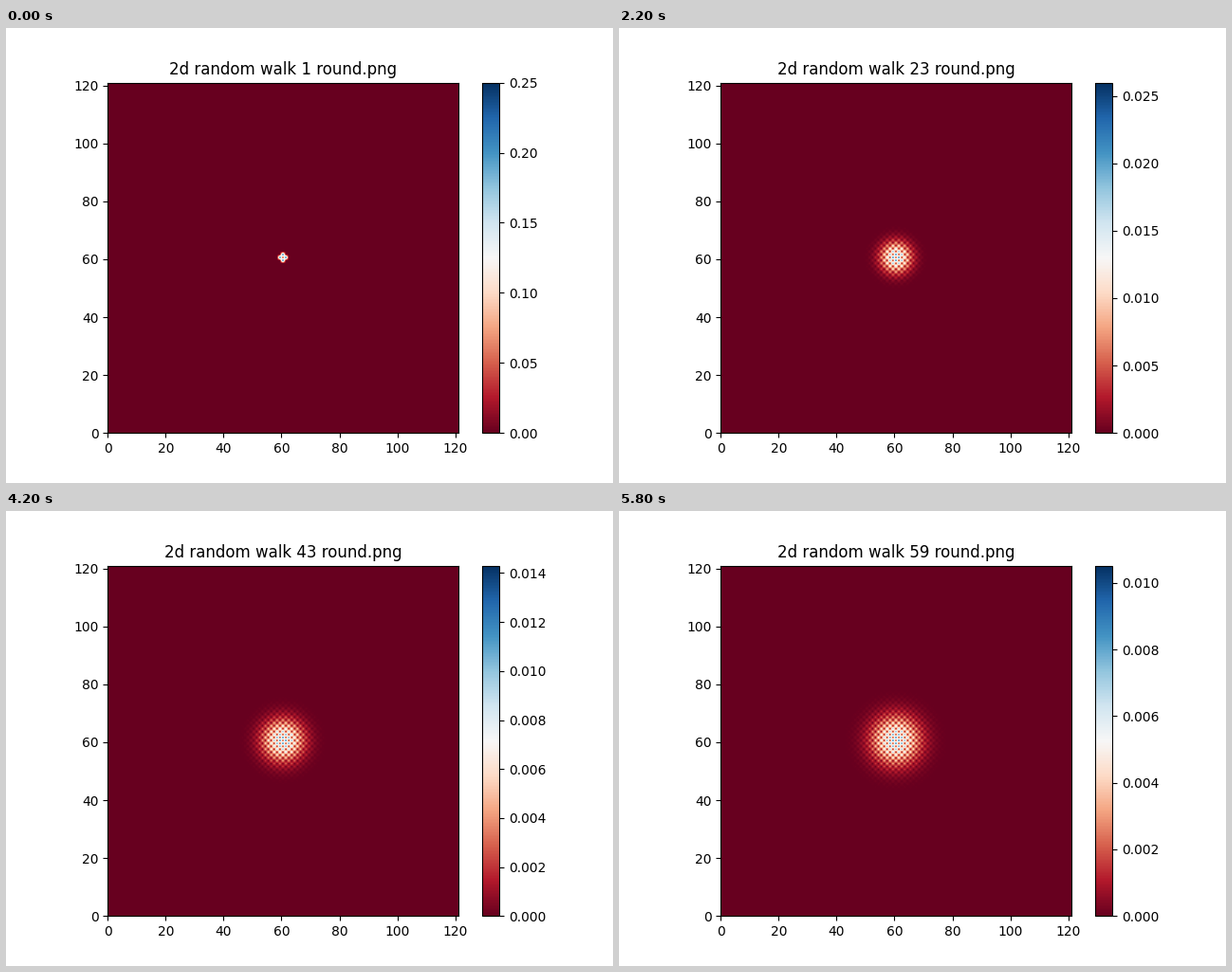
A matplotlib script that plays this animation: 640 px wide and 480 px high, repeating every 5.9 s.

```python
import numpy as np
import matplotlib.pyplot as plt
from matplotlib.animation import FuncAnimation

ROUNDS = 59
SIZE = 121


def spread(p):
    """One step of the walk: each cell shares its chance with four neighbours."""
    q = np.pad(p, 1)
    return (q[:-2, 1:-1] + q[2:, 1:-1] + q[1:-1, :-2] + q[1:-1, 2:]) / 4


def walk(rounds):
    p = np.zeros((SIZE, SIZE))
    p[SIZE // 2, SIZE // 2] = 1
    steps = []
    for _ in range(rounds):
        p = spread(p)
        steps.append(p)
    return steps


steps = walk(ROUNDS)

fig, ax = plt.subplots(figsize=(6.4, 4.8), dpi=100)
image = ax.imshow(steps[0], cmap="RdBu", interpolation="bilinear",
                  origin="lower", extent=[0, SIZE, 0, SIZE],
                  vmin=0, vmax=steps[0].max())
fig.colorbar(image, ax=ax)
title = ax.set_title("")


def draw(i):
    image.set_data(steps[i])
    image.set_clim(0, steps[i].max())
    title.set_text(f"2d random walk {i + 1} round.png")
    return image, title


anim = FuncAnimation(fig, draw, frames=ROUNDS, interval=100,
                     repeat=True, repeat_delay=0, blit=False)
plt.show()
```
